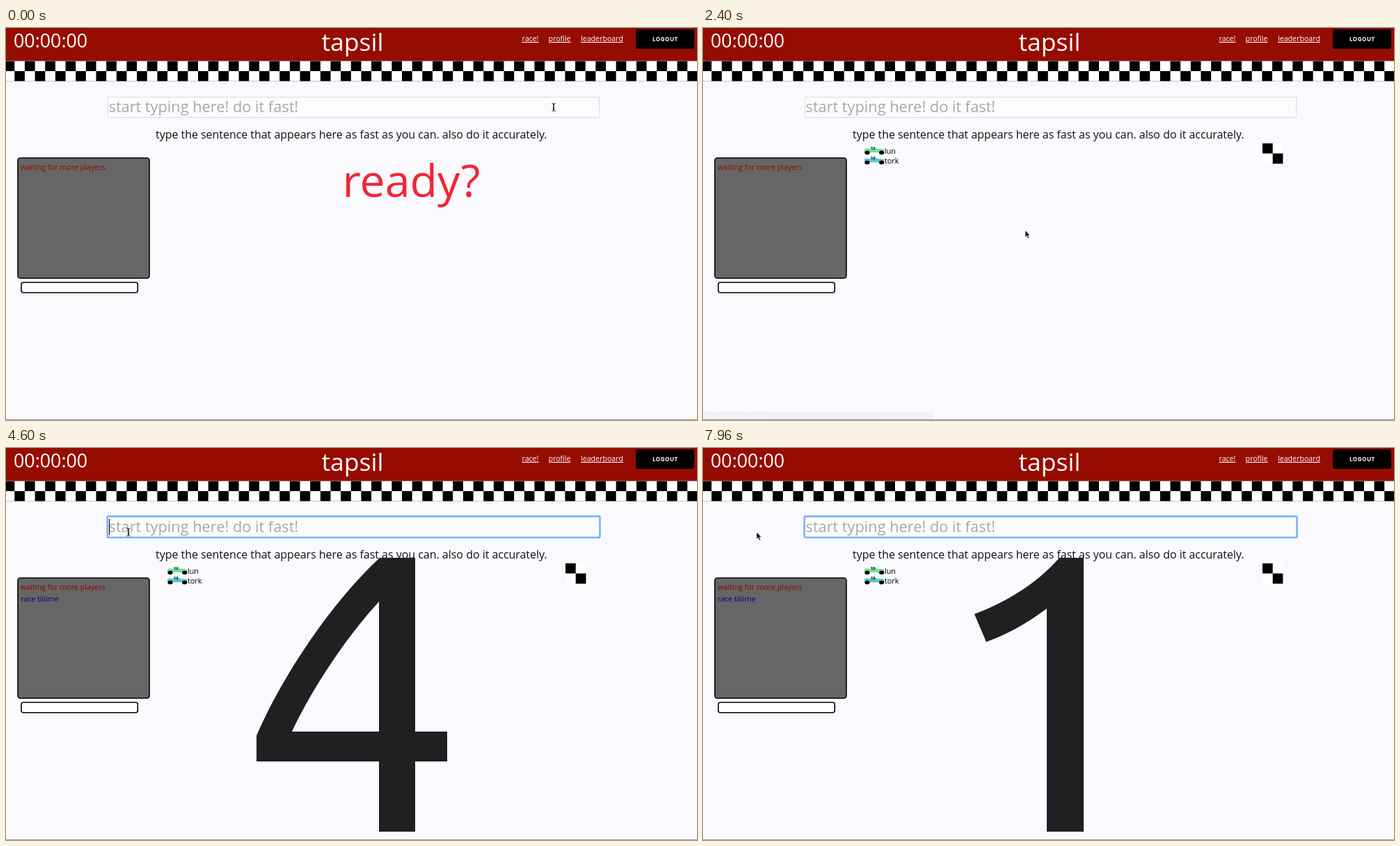
An HTML page for the animation above (8 s loop, 993 px wide and 564 px high).

```html
<!DOCTYPE html>
<html lang="en">
<head>
<meta charset="utf-8">
<title>Typing race</title>
<style>
  html, body { margin: 0; width: 100%; height: 100%; overflow: hidden; background: #f9f9fe; }
  svg { display: block; width: 100vw; height: 100vh; font-family: "Open Sans", "Noto Sans", sans-serif; }
  .small { font-size: 10.75px; }
  .nav { fill: #fff; font-size: 10.65px; text-decoration: underline; }
  .box { stroke: #000; stroke-width: 1.6; }
</style>
</head>
<body>
<svg viewBox="0 0 993 564">
  <defs>
    <pattern id="checker" x="12.3" y="47.4" width="29.3" height="29.3" patternUnits="userSpaceOnUse">
      <rect width="29.3" height="29.3" fill="#fff"/>
      <path d="M14.65 0h14.65v14.65h-14.65zM0 14.65h14.65v14.65H0z"/>
    </pattern>
    <g id="car">
      <path d="M1 5Q1 3 4 3.2L9 4 11 2.2H17L20 4H27Q30 4 29.5 9H1Z"/>
      <g fill="#000">
        <ellipse cx="5" cy="9.2" rx="3.6" ry="2.8"/>
        <ellipse cx="25.7" cy="9.2" rx="3.6" ry="2.8"/>
        <text x="10" y="4.6" font-size="5.5" font-weight="700">12</text>
      </g>
    </g>
  </defs>

  <rect width="993" height="564" fill="#f9f9fe"/>
  <rect y="563" width="993" height="1" fill="#a49f90"/>

  <rect width="993" height="47.6" fill="#960c00"/>
  <rect y="47.4" width="993" height="29.3" fill="url(#checker)"/>
  <g fill="#fff">
    <text x="11" y="28" font-size="26.8">00:00:00</text>
    <text x="498" y="33" font-size="35.5" text-anchor="middle">tapsil</text>
  </g>
  <text class="nav" x="741.5" y="19">race!</text>
  <text class="nav" x="779.5" y="19">profile</text>
  <text class="nav" x="826" y="19">leaderboard</text>
  <rect x="905" y="2" width="84" height="28" rx="3"/>
  <text x="929" y="19" fill="#fff" font-size="8" font-weight="700" letter-spacing=".5">LOGOUT</text>

  <rect x="146.5" y="99.5" width="706" height="29" fill="#fcfcfe" stroke="#dcdce0"/>
  <rect id="focus" x="145.7" y="98.3" width="707.8" height="30.4" rx="1.5" fill="none" stroke="#78b4f8" stroke-width="2.6"/>
  <text x="147.5" y="121" fill="#a8a8a8" font-size="21.75">start typing here! do it fast!</text>
  <rect id="caret" x="148" y="102" width="1" height="23"/>
  <text x="215" y="158.5" fill="#111" font-size="15.95">type the sentence that appears here as fast as you can. also do it accurately.</text>

  <rect class="box" x="17" y="187" width="189" height="173" rx="3.5" fill="#666"/>
  <text class="small" x="21" y="204" fill="#8f0500">waiting for more players</text>
  <text class="small" id="raceTime" x="21" y="221.3" fill="#00008b">race tiiiime</text>
  <rect class="box" x="22" y="366" width="167.3" height="14.8" rx="3" fill="#fff"/>

  <text id="ready" x="483.6" y="243" fill="#ee2737" font-size="64.4">ready?</text>
  <g id="track">
    <use href="#car" x="231" y="170" fill="#70e49b"/>
    <text class="small" x="261" y="181">lun</text>
    <use href="#car" x="231" y="184.3" fill="#58c6cd"/>
    <text class="small" x="261" y="195.3">tork</text>
    <rect x="804" y="166" width="29.4" height="29.3" fill="#fff"/>
    <path d="M804 166h14.7v14.6H804zM818.7 180.6h14.7v14.7h-14.7z"/>
  </g>

  <g id="status">
    <path d="M0 552H328Q331 552 331 555V564H0Z" fill="#646464"/>
    <text x="1" y="561" fill="#fff" font-size="7.8" font-family="'Liberation Sans', Arial, sans-serif">drywave.herokuapp.com/#</text>
  </g>

  <path id="digit" role="img" fill="#202023" fill-rule="evenodd"/>

  <g id="cursor">
    <path id="arrow" d="M0 0V10.2L2.3 8.2 4 12 5.9 11.2 4.2 7.5H7.2Z" stroke="#fff" stroke-width=".8"/>
    <path id="beam" d="M-2.5-5.5Q0-5.5 0-4V4Q0 5.5-2.5 5.5M2.5-5.5Q0-5.5 0-4V4Q0 5.5 2.5 5.5M-1.3 2H1.3" fill="none" stroke="#111"/>
  </g>
</svg>
<script>
const LOOP = 8000, CLICKED = 1920, COUNTDOWN = 3280, FOCUS = 4400, BLINK = 500;

const digits = {
  5: "M412 158H603V203H459L450 310C560 314 617 358 617 443C617 515 562 560.5 472 560.5C436 560.5 402 553 374 542L385 494C407 504 436 514 470 514C530 514 562 486 562 440C562 385 520 353 399 353Z",
  4: "M537 158H588V408H634V451H588V552H536V451H360V414C398 326 468 222 537 158ZM536 221C484 278 437 352 411 408H536Z",
  3: "M376 180C399 163 438 150 476 150C552 150 598 189 598 256C598 293 574 323 538 338C583 350 615 390 615 441C615 516 560 561 471 561C430 561 395 552 368 542L379 494C402 505 436 514 468 514C529 514 560 489 560 440C560 390 523 364 466 364H439V321H470C513 321 543 296 543 256C543 217 515 196 472 196C440 196 417 206 396 220Z",
  2: "M380 194C404 167 440 150 480 150C557 150 603 192 603 262C603 318 568 366 516 416C478 452 447 478 443 507H614V552H386C383 480 425 434 476 385C520 343 549 308 549 265C549 219 521 196 478 196C447 196 422 211 405 230Z",
  1: "M512 158H547V552H494V231C466 252 438 268 407 279L390 239C438 221 482 193 512 158Z"
};

// [time, x, y]
const pointer = [
  [0, 787, 114], [200, 780, 118], [900, 345, 298], [1040, 336, 301], [1250, 345, 300],
  [1700, 463, 291], [2800, 463, 291], [3600, 150, 66], [3760, 143, 69],
  [4200, 176, 121], [4800, 176, 121], [5300, 77, 121], [LOOP, 77, 121]
];

const part = id => document.getElementById(id);
const [focusRing, caret, raceTime, ready, track, status_, digit, cursor, arrow, beam] =
  ["focus", "caret", "raceTime", "ready", "track", "status", "digit", "cursor", "arrow", "beam"].map(part);
const show = (el, on) => { el.style.visibility = on ? "visible" : "hidden"; };
const ramp = (t, from, to) => Math.min(1, Math.max(0, (t - from) / (to - from)));
const ease = p => p * p * (3 - 2 * p);

function pointerAt(t) {
  const i = Math.max(1, pointer.findIndex(step => step[0] > t));
  const [t0, x0, y0] = pointer[i - 1], [t1, x1, y1] = pointer[i];
  const p = ease(ramp(t, t0, t1));
  return [x0 + (x1 - x0) * p, y0 + (y1 - y0) * p];
}

let shownDigit;
function setDigit(n) {
  if (n === shownDigit) return;
  shownDigit = n;
  digit.setAttribute("d", digits[n] || "");
  digit.setAttribute("aria-label", digits[n] ? n : "");
}

function draw(t) {
  const [x, y] = pointerAt(t);
  const overInput = x > 146 && x < 853 && y > 99 && y < 129;
  cursor.setAttribute("transform", `translate(${x.toFixed(1)} ${y.toFixed(1)})`);
  show(arrow, !overInput);
  show(beam, overInput);

  show(ready, t < CLICKED);
  show(track, t >= CLICKED);
  status_.style.opacity = ramp(t, 700, 850) * (1 - ramp(t, 2160, 2415));

  const counting = t >= COUNTDOWN;
  show(raceTime, counting);
  setDigit(counting ? 5 - Math.floor((t - COUNTDOWN) / 1000) : 0);

  const focused = t >= FOCUS;
  show(focusRing, focused);
  show(caret, focused && Math.floor((t - FOCUS) / BLINK) % 2 === 0);
}

const start = performance.now();
function tick() {
  draw((performance.now() - start) % LOOP);
  requestAnimationFrame(tick);
}
tick();
</script>
</body>
</html>
```
